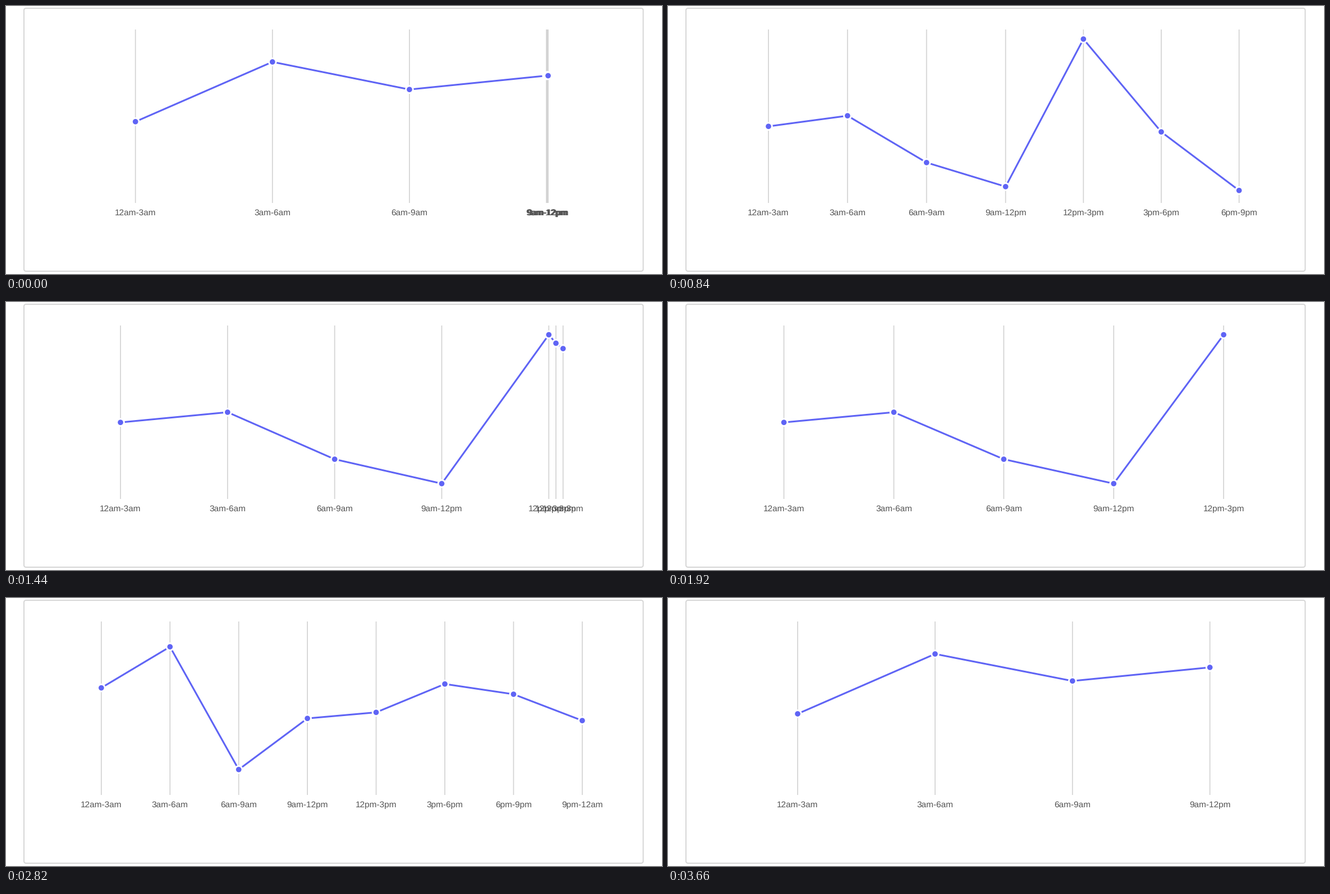
These frames come from a looping animation (1169x479 px, 3780 ms). A matplotlib script:

```python
import math

import matplotlib.pyplot as plt
from matplotlib.animation import FuncAnimation
from matplotlib.patches import Circle, FancyBboxPatch

W, H, DPI = 1169, 479, 64
PT = 72 / DPI  # points per pixel
FRAMES, STEP = 63, 60

BLUE, GRID, BORDER, INK = "#5f64f5", "#d3d3d3", "#d6d6d6", "#555555"
LEFT, SPAN = 108.6, 979.5
TOP, BOTTOM, BASELINE = 42, 352, 373.8

SLOTS = 8
LABELS = ["12am-3am", "3am-6am", "6am-9am", "9am-12pm",
          "12pm-3pm", "3pm-6pm", "6pm-9pm", "9pm-12am"]

FOUR = [207, 100, 148.3, 124]
SEVEN = [215.2, 197, 281, 324.6, 58.5, 225.9, 331.5]
FIVE = SEVEN[:5]
EIGHT = [160.6, 87.2, 306.6, 215.2, 204.4, 153.7, 172, 219.1]

# (start in ms, heights before, heights after)
MOVES = [(-850, EIGHT, FOUR), (42, FOUR, SEVEN), (968, SEVEN, FIVE),
         (1876, FIVE, EIGHT), (2764, EIGHT, FOUR)]
RATE = 0.0085  # spring frequency per ms
HOLD, SETTLE = 110, 882

plt.rcParams["font.family"] = "Liberation Sans"
plt.rcParams["text.hinting"] = "none"


def spring(ms):
    """Critically damped spring from 0 to 1 that snaps to rest."""
    if ms >= SETTLE:
        return 1.0
    x = RATE * ms
    return 1 - (1 + x) * math.exp(-x)


def layout(heights):
    """Evenly spaced points; spare slots sit on the last one."""
    n = len(heights)
    last = [min(i, n - 1) for i in range(SLOTS)]
    return [(LEFT + SPAN * (i + 0.5) / n, heights[i]) for i in last]


def mix(a, b, p):
    return a + (b - a) * p


fig = plt.figure(figsize=(W / DPI, H / DPI), dpi=DPI, facecolor="white")
ax = fig.add_axes([0, 0, 1, 1])
ax.set_xlim(0, W)
ax.set_ylim(H, 0)
ax.axis("off")

ax.add_patch(FancyBboxPatch(
    (32, 4), 1103.5, 470, boxstyle="round,pad=0,rounding_size=4",
    fc="none", ec=BORDER, lw=2 * PT, snap=False))

rules = [ax.plot([0, 0], [TOP, BOTTOM], color=GRID, lw=1.7 * PT, zorder=2,
                 solid_capstyle="butt", snap=False)[0]
         for _ in range(SLOTS)]
curve, = ax.plot([], [], color=BLUE, lw=3.1 * PT, zorder=3,
                 solid_joinstyle="round", snap=False)
dots = [ax.add_patch(Circle((0, 0), 6.3, fc=BLUE, ec="white",
                            lw=2.9 * PT, zorder=4))
        for _ in range(SLOTS)]
names = [ax.text(0, BASELINE, "", color=INK, size=15.4 * PT, zorder=5,
                 ha="center", va="baseline")
         for _ in range(SLOTS)]


def draw(frame):
    t = frame * STEP
    start, before, after = [m for m in MOVES if m[0] + HOLD <= t][-1]
    p = spring(t - start)
    points = [(mix(x0, x1, p), mix(y0, y1, p))
              for (x0, y0), (x1, y1) in zip(layout(before), layout(after))]
    n = len(after)
    count = n if p == 1 else max(len(before), n)

    curve.set_data(*zip(*points[:count]))
    for i, (x, y) in enumerate(points):
        for part in (rules[i], dots[i], names[i]):
            part.set_visible(i < count)
        rules[i].set_xdata([x, x])
        dots[i].center = (x, y)
        names[i].set_x(x)
        names[i].set_text(LABELS[min(i, n - 1)])
    return [curve, *rules, *dots, *names]


anim = FuncAnimation(fig, draw, frames=FRAMES, interval=STEP,
                     repeat=True, repeat_delay=0, blit=False)
plt.show()
```
